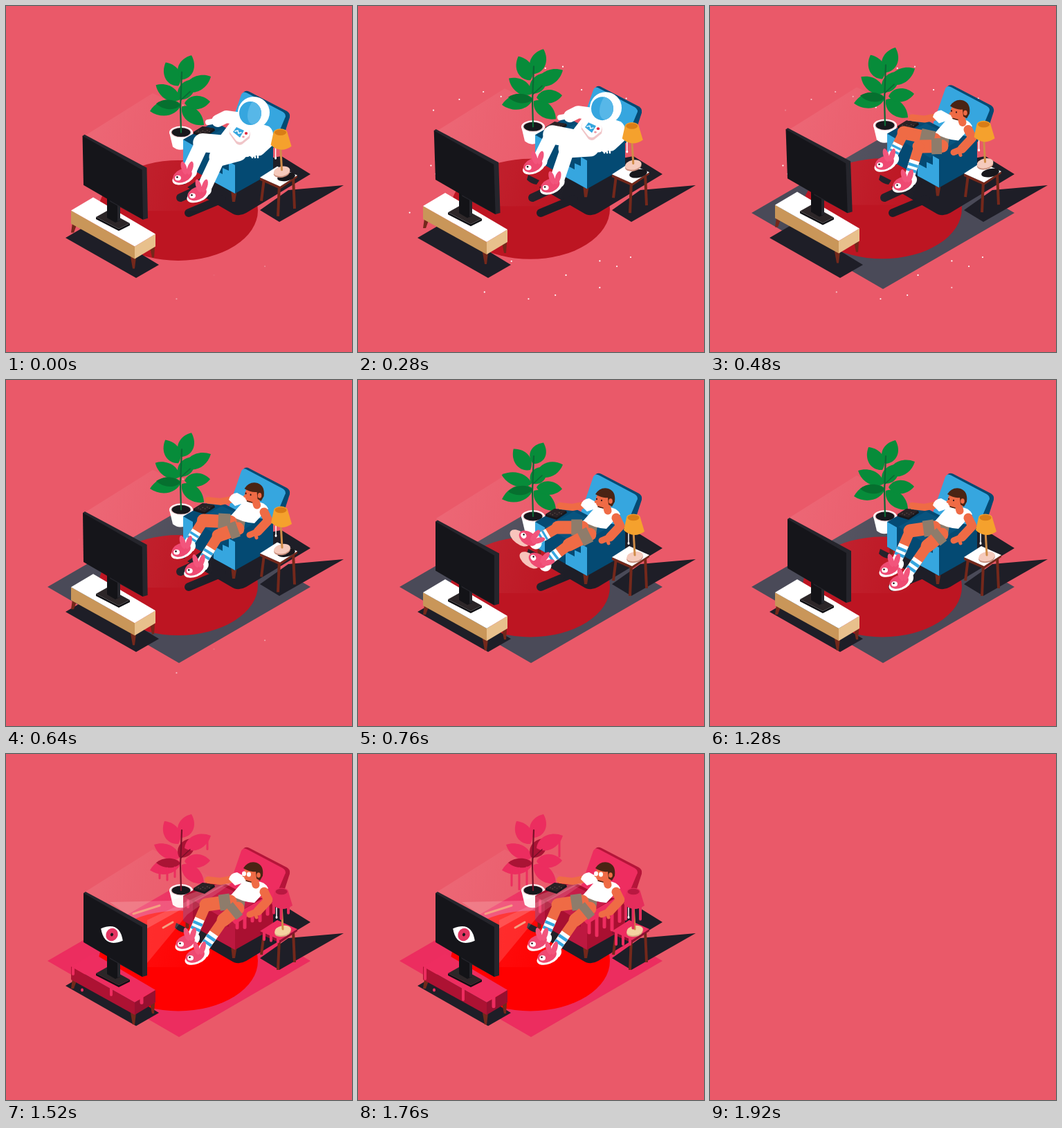
Animation, 500 px wide and 500 px high, one loop 1.96 s. Source, as an HTML page with a canvas:

```html
<!DOCTYPE html>
<html lang="en">
<head>
<meta charset="utf-8">
<title>Couch evening</title>
<style>
html,body{margin:0;width:100%;height:100%;overflow:hidden;background:#ea5969}
canvas{display:block;width:100vmin;height:100vmin}
</style>
</head>
<body>
<canvas id="c" width="500" height="500"></canvas>
<script>
const g = document.getElementById('c').getContext('2d');
const LOOP = 1960, STEP = 40, RISE = 20.5, DROP = 500, LAND = 680, MELT = 1320;
const BG = '#ea5969', DARK = '#1e1e27', SKIN = '#ef6b45', WOOD = '#74281b', PINK = '#ee4a72';

const mix = (a, b, k) => a + (b - a) * k;
const clamp = v => Math.max(0, Math.min(1, v));
const between = (p, q, k) => [mix(p[0], q[0], k), mix(p[1], q[1], k)];

// Height of the floating room: eases up, falls with gravity
function liftAt(t) {
  if (t < DROP) return -RISE + 8.5 * (1 - t / DROP) ** 2;
  return -RISE * (1 - clamp((t - DROP) / (LAND - DROP)) ** 2);
}
// Bend of soft parts: pulled up in the air, damped swing after landing
function flexAt(t) {
  const d = t - LAND;
  return d < 0 ? liftAt(t) / 7 : 9 * Math.exp(-d / 110) * Math.sin(d / 60 + .4);
}
const kickAt = t => Math.sin(Math.PI * clamp((t - 580) / 360)) ** 2;

function fill(c, d) {
  g.fillStyle = c;
  g.fill(new Path2D(d));
}
function oval(c, x, y, rx, ry, a = 0) {
  g.fillStyle = c;
  g.beginPath();
  g.ellipse(x, y, rx, ry, a, 0, 7);
  g.fill();
}
function line(c, w, pts, cap = 'round') {
  g.strokeStyle = c;
  g.lineWidth = w;
  g.lineCap = cap;
  g.lineJoin = 'round';
  g.beginPath();
  pts.forEach(p => g.lineTo(p[0], p[1]));
  g.stroke();
}
function at(x, y, draw, a = 0) {
  g.save();
  g.translate(x, y);
  g.rotate(a);
  draw();
  g.restore();
}
const drip = (c, x, y, len, w = 4) => line(c, w, [[x, y], [x, y + len]]);

function stars(t) {
  let seed = 11;
  const rnd = () => (seed = seed * 16807 % 2147483647) / 2147483647;
  for (let i = 0; i < 40; i++) {
    const a = i * 2.4, r = .62 + .38 * rnd(), lag = rnd();
    g.globalAlpha = clamp((t + 50 - lag * 180) / 110) * clamp((700 - lag * 200 - t) / 90);
    oval('#fff', 255 + 190 * r * Math.cos(a), 255 + 175 * r * Math.sin(a), 1.1, 1.1);
  }
  g.globalAlpha = 1;
}

function field() {
  const mark = (x, y, dx, dy) => line('#fff', 2, [[x - dx, y - dy], [x + dx, y + dy]], 'butt');
  g.save();
  g.beginPath();
  g.ellipse(249, 299, 115, 72.5, 0, 0, 7);
  g.clip();
  mark(266, 299, 86, 50);
  mark(226, 355, 36, 21);
  for (let i = 0; i < 11; i++) {
    const x = i * 13.2, y = -i * 7.9;
    if (i % 5) mark(245 + x, 366 + y, 6, 4);
    else mark(245 + x, 366 + y, 7, -4);
    mark(194 + x, 278 + y, 6, 4);
  }
  g.restore();
}

function floor(s, u) {
  if (s !== 'space') fill(s === 'melt' ? '#ec2d5f' : '#4a4a58', 'M60 299L250 189L440 299L250 409Z');
  oval({game: '#058b38', melt: '#ff0000'}[s] || '#bd1522', 249, 299 + u * .3, 115, 72.5);
  if (s === 'game') field();
  fill(DARK, 'M86 335L122 314L221 374L188 393Z');
  fill(DARK, 'M367 295L408 266L488 259L395 312Z');
  fill(DARK, 'M398 217L440 243L347 299Q335 306 324 298L262 262L300 235Z');
  fill(DARK, 'M246 244L262 252L258 258Q250 257 244 251Z');
  if (s === 'space' || s === 'home') {
    line(DARK, 12, [[264, 299], [312, 279]]);
    if (u < -3) line(DARK, 12, [[252, 277], [300, 255]]);
  }
}

function beam(u) {
  const b = g.createLinearGradient(115, 200, 310, 250);
  b.addColorStop(0, 'rgba(255,225,225,.1)');
  b.addColorStop(.5, 'rgba(255,225,225,.05)');
  b.addColorStop(1, 'rgba(255,225,225,0)');
  at(0, u, () => fill(b, 'M113 200L212 138L345 200L345 308H204Z'));
}

function rays() {
  fill('rgba(255,215,215,.22)', 'M150 214L238 212L344 174L204 252Z');
  fill('rgba(255,215,215,.16)', 'M204 240L344 174L262 232L204 302Z');
  const c = '#f5a082';
  line(c, 3, [[184, 231], [222, 219]]);
  line(c, 3, [[227, 251], [241, 243]]);
}

function leaf(c, bx, by, tx, ty, w) {
  const dx = tx - bx, dy = ty - by, n = Math.hypot(dx, dy);
  const px = -dy / n * w, py = dx / n * w;
  g.fillStyle = c;
  g.beginPath();
  g.moveTo(bx, by);
  for (const k of [1, -1]) {
    const a = [bx + dx * .2 + px * k, by + dy * .2 + py * k];
    const b = [bx + dx * .7 + px * k, by + dy * .7 + py * k];
    if (k > 0) g.bezierCurveTo(...a, ...b, tx, ty);
    else g.bezierCurveTo(...b, ...a, bx, by);
  }
  g.fill();
}

function plant(s, f, len) {
  const m = s === 'melt', c = m ? '#ec2d5f' : '#078c3a', d = m ? '#aa1435' : '#06702f';
  const stem = m ? '#7a1028' : '#0b6834';
  fill('#fff', 'M236 197L241 218Q252 227 265 217L270 197Z');
  oval('#fff', 253, 197, 17, 9);
  oval('#f0c9ce', 253, 197, 15, 7.5);
  oval('#17171c', 253, 197, 13.5, 6.5);
  leaf(c, 254, 160, 286, 187 + f * .4, 14);
  leaf(c, 253, 157, 208, 168 + f, 15);
  leaf(c, 251, 150, 214 - f * 1.5, 131 + f * 1.4, 13);
  leaf(d, 252, 158, 217, 157 + f, 9);
  leaf(c, 258, 155, 295, 154 + f * .8, 13);
  leaf(c, 249, 130, 229 - f, 97 + f * .6, 15);
  leaf(c, 253, 121, 268, 87 + f * .8, 15);
  leaf(m ? d : c, 250, 149, 272, 122 + f, 14);
  leaf(c, 258, 136, 296, 118 + f, 14);
  line(stem, 2.2, [[253, 197], [252, 160], [254, 110]]);
  line(stem, 1.6, [[253, 150], [266, 138]]);
  if (m) {
    for (let i = 0; i < 3; i++) drip(c, 222 + i * 11, 166 - i, len * (1.5 + i % 2 * .4), 3);
    drip(c, 291, 124, len * 1.5, 3);
  }
}

function sofa(s, len) {
  const m = s === 'melt', a = m ? '#ee2d60' : '#36a6df', b = m ? '#a91031' : '#044a73';
  const front = m ? '#bd1840' : a;
  line(WOOD, 5, [[262, 240], [262, 252]], 'butt');
  fill(WOOD, 'M325 277H334L331 295H327Z');
  fill(m ? '#b51539' : b, 'M343 137Q346 133 352 136L406 164Q411 167 410 173L399 207L380 222Z');
  fill(a, 'M340 140Q343 134 349 138L400 165Q406 169 403 174L383 222L322 192Z');
  fill(b, 'M256 205L298 181Q304 179 310 184L350 205L386 211V252L331 283L256 241Z');
  fill(m ? '#c71d49' : '#08547f', 'M272 212L312 190L360 214L318 240Z');
  fill(front, 'M256 205L270 213V249L256 241Z');
  fill(front, 'M300 248L313 255V273L300 266Z');
  fill(front, 'M313 246L322 250V237L331 242V283L313 273Z');
  if (m) {
    fill(a, 'M322 237L374 207L387 212L331 246Z');
    for (let i = 0; i < 5; i++) drip(a, 334 + i * 11, 242 - i * 6, len * (1 + (i * .618) % 1), 5);
    drip(a, 263, 212, len);
  }
}

function foot(p, k) {
  at(p[0], p[1], () => {
    g.scale(1.1, 1.1);
    oval(k > .5 ? '#f8c4bc' : '#fff', -7 - 7 * k, 8 + 6 * k, 15, 8, -.35);
    oval('#fff', 3, 0, 8, 8);
    oval(PINK, -8, 5, 13, 8.5, -.4);
    oval('#f2557c', -6, -5, 3.6, 9, -.3);
    oval('#f2557c', 2, -5, 3.6, 9, .3);
    oval('#fff', -14, 8, 4, 3.4);
    oval('#2a1118', -15, 7, 1.2, 1.2);
  }, k);
}

function leg(s, hip, knee, ankle, k) {
  if (s === 'space') {
    line('#fff', 27, [hip, knee]);
    line('#fff', 21, [knee, ankle]);
  } else {
    line(SKIN, 19, [hip, knee]);
    line(SKIN, 15, [knee, between(knee, ankle, .6)]);
    line('#8e7c6b', 23, [hip, between(hip, knee, .45)], 'butt');
    line('#fff', 14.5, [between(knee, ankle, .42), ankle], 'butt');
    for (const n of [.52, .68])
      line('#36a6df', 14.5, [between(knee, ankle, n), between(knee, ankle, n + .08)], 'butt');
  }
  foot(ankle, k);
}

function remote() {
  fill('#17171c', 'M271 194L284 186L301 189L302 192L287 202L271 197Z');
  fill('#2b2225', 'M271 194L284 186L301 189L287 199Z');
  for (let i = 0; i < 6; i++) oval('#5b4a48', 278 + i * 3.2, 193 + (i % 2) * 2 - i * .3, 1, .7);
}

function helmet() {
  oval('#fff', 358, 166, 23, 23);
  oval('#36a6df', 353, 167, 16, 17);
  g.save();
  g.beginPath();
  g.ellipse(353, 167, 16, 17, 0, 0, 7);
  g.clip();
  oval('#57b7e8', 363, 162, 12, 22, .4);
  g.restore();
}

function fanHat() {
  fill('#0a7a39', 'M341 146Q346 142 350 147L349 160L340 158Z');
  fill('#e22d32', 'M339 171Q341 155 354 155Q368 158 368 174L360 178Z');
  fill('#b81c28', 'M339 171L343 168L363 175L360 179Z');
  fill('#0a7a39', 'M362 157Q367 153 372 158V172Q366 177 361 171Z');
  oval('#083f24', 345, 146, 4.5, 2);
  oval('#083f24', 367, 157, 5, 2);
  line('#fff', 2, [[345, 146], [350, 146], [354, 158]]);
  line('#fff', 2, [[366, 157], [362, 149], [358, 151], [359, 160]]);
}

function head(s) {
  line(SKIN, 11, [[358, 178], [361, 189]]);
  oval(SKIN, 353, 173, 9.5, 12, .25);
  oval(SKIN, 344, 176, 2.4, 2);
  fill('#4a2414', 'M343 165Q350 154 362 157Q373 161 371 176L367 183L362 180L361 170Q352 171 343 165Z');
  oval(SKIN, 365, 175, 2.8, 3.8);
  line('#4a2414', 1.6, [[347, 183], [354, 185]]);
  if (s === 'melt') {
    oval('#fff', 344, 173, 3, 3.4);
    oval('#fff', 351, 174, 3, 3.4);
  } else {
    oval('#2a1118', 345, 172, 1, 1.3);
    oval('#2a1118', 352, 174, 1, 1.3);
  }
  if (s === 'game') fanHat();
}

function torso(s) {
  if (s === 'space') {
    line('#fff', 18, [[340, 175], [318, 172], [306, 178]]);
    line('#fff', 8, [[304, 178], [292, 180]]);
    fill('#fff', 'M332 170L306 204L315 232L350 230L380 214Q392 196 380 186Z');
    return;
  }
  line(SKIN, 10, [[330, 180], [310, 184], [292, 182]]);
  fill('#8e7c6b', 'M324 203L346 211L343 229L322 232L311 215Z');
  fill(s === 'game' ? '#0b6b38' : '#fff',
    'M345 177L334 171Q324 172 322 181L331 190L340 187L325 204Q341 214 359 215L370 203L379 194Q374 184 362 184Z');
  if (s === 'game') {
    line('#f4b52c', 5, [[323, 177], [330, 189]], 'butt');
    at(339, 199, () => {
      g.fillStyle = '#fff';
      g.font = 'bold 21px Roboto, Arial, sans-serif';
      g.textAlign = 'center';
      g.textBaseline = 'middle';
      g.fillText('99', 0, 1);
    }, .32);
  }
}

function chestBox() {
  fill('#f0c5c8', 'M-14 -2Q-16 -13 -6 -14L14 -7Q17 -4 15 4L4 13Q0 15 -4 12Z');
  fill('#fff', 'M-14 -5Q-14 -15 -5 -15L13 -8Q17 -5 14 1L4 9Q0 11 -4 8Z');
  fill('#36a6df', 'M-9 -5L-4 -12L7 -7L1 3Z');
  line('#fff', 1.5, [[-6, -6], [-2, -7], [-1, -3], [3, -4]]);
  oval('#e22d42', 10, -3, 2.2, 2);
  oval('#ee9aa6', 6, 2, 1.8, 1.5);
}

function nearArm(s) {
  if (s === 'space') {
    line('#fff', 19, [[374, 195], [378, 207], [365, 219]]);
    line('#fff', 9, [[364, 220], [356, 226]]);
    for (let x = 355; x < 365; x += 4) line('#fff', 2.5, [[x, 222], [x + 1, 231]]);
    at(337, 199, chestBox);
    return;
  }
  line(SKIN, 13, [[373, 199], [379, 211], [364, 227]]);
  line(SKIN, 9, [[364, 227], [352, 232]]);
  line(SKIN, 5, [[360, 230], [362, 236]]);
  if (s === 'game') line('#f4b52c', 6, [[364, 191], [378, 201]], 'butt');
}

function person(s, u, kick) {
  const f = -u / RISE;
  // rest place, drift while floating, throw on landing
  const joint = (x, y, fx, fy, kx, ky) => [x + fx * f + kx * kick, y + fy * f + ky * kick];
  const turn = clamp(kick - f);
  at(0, u, () => { torso(s); remote(); });
  leg(s, [324, 213 + u], joint(289, 218, -9, -35, 0, -5), joint(268, 266, -7, -45, -13, -33), turn);
  leg(s, [335, 223 + u], joint(314, 240, -12, -37, -9, -2), joint(282, 286, 5, -35, -13, -21), turn);
  at(0, u, () => {
    nearArm(s);
    if (s === 'space') helmet();
    else at(f * 4, 0, () => head(s));
  });
}

function table(s, u, len) {
  const m = s === 'melt', top = m ? '#ee2d60' : '#fff';
  line(WOOD, 4, [[373, 258], [369, 290]], 'butt');
  line(WOOD, 4, [[415, 256], [417, 301]], 'butt');
  line(WOOD, 4, [[395, 266], [393, 312]], 'butt');
  fill(m ? '#8f1030' : WOOD, 'M367 256L396 269L421 253V256L396 273L367 260Z');
  fill(top, 'M367 256L392 240L421 253L396 269Z');
  if (u < -3) oval('#17171c', 405, 255, 13, 6, -.2);
  if (m) for (let i = 0; i < 3; i++) drip(top, 373 + i * 10, 259 + i * 4, len * (1 - i * .25));
}

function lamp(s, len) {
  const m = s === 'melt', c = m ? '#e52d5c' : '#f5a12d';
  oval(m ? '#d9b084' : '#c98f7d', 400, 257, 12, 7, -.2);
  oval(m ? '#f3d3a0' : '#f5cabc', 400, 255, 12, 7, -.2);
  line('#cf8c48', 3, [[398, 218], [400, 253]]);
  line('#fff', 1.5, [[391, 219], [391, 235]]);
  oval('#fff', 391, 236, 1.5, 2);
  fill(c, 'M388 199L384 217Q398 230 414 219L408 199Z');
  oval(c, 398, 199, 10, 5.5);
  oval(m ? '#b91841' : '#d97d16', 398, 199, 8.5, 4.2);
  if (m) for (let i = 0; i < 3; i++) drip(c, 387 + i * 10.5, 218 + i % 2 * 3, len * (1.3 + i % 2 * .6));
}

function ball(t) {
  const k = (t - 1040) / 200;
  oval(DARK, 221 + 70 * k, 307 - 40 * k, 17, 9, -.35);
  at(221 + 70 * k, 238 - 34 * k + 10 * k * k, () => {
    fill('#c9252b', 'M-20 0C-12 -16 12 -16 20 0C12 16 -12 16 -20 0Z');
    fill('#a61722', 'M-20 0C-8 10 8 10 20 0C12 16 -12 16 -20 0Z');
    line('#fff', 2, [[-9, 2], [9, 2]]);
    for (let x = -7; x < 9; x += 4.5) line('#fff', 1.6, [[x, -2], [x, 6]]);
  }, -.5 + k * 1.5);
}

function stand(s, len) {
  const m = s === 'melt', top = m ? '#ee2d60' : '#fff';
  fill(WOOD, 'M96 325L102 328L98 339H94Z');
  fill(WOOD, 'M208 360H215L214 375H211Z');
  fill(WOOD, 'M180 374H188L186 391H183Z');
  fill(m ? '#ad1233' : '#c99659', 'M94 307L186 359V377L94 326Z');
  fill(m ? '#971030' : '#e8c08c', 'M186 359L216 341V359L186 377Z');
  fill(top, 'M94 307L126 288L216 341L186 359Z');
  if (m) {
    drip(top, 97, 309, len);
    drip(top, 152, 339, len);
    drip(top, 196, 352, len * .8, 5);
    oval(top, 110, 341, 2, 2.6);
  }
}

function eye() {
  fill('#fff', 'M-18 0Q0 -23 18 0Q0 23 -18 0Z');
  oval('#e33561', 0, 0, 8.5, 9.5);
  oval('#17171c', 0, 0, 2, 2.4);
}

function tv(s, u, f) {
  fill('#101014', 'M130 317L163 334L179 326V329L163 337L130 320Z');
  fill('#2c2628', 'M130 317L146 308L179 326L163 334Z');
  fill('#131317', 'M146 282L165 292V322L158 325L146 318Z');
  fill('#26262c', 'M161 290L165 292V322L161 323Z');
  at(0, f * .8, () => {
    const lean = -u / RISE * .035;
    g.transform(1, 0, lean, 1, -272 * lean, 0);
    fill('#25252c', 'M112 201L115 199L204 247V320L197 322L150 296Z');
    fill('#15151a', 'M112 201L197 250V322L112 272Z');
    if (s === 'melt') at(153, 261, eye, .5);
  });
}

function sceneAt(t) {
  if (t < 400) return 'space';
  if (t >= MELT) return 'melt';
  return t >= 880 && t < 1240 ? 'game' : 'home';
}

function draw(t) {
  g.fillStyle = BG;
  g.fillRect(0, 0, 500, 500);
  if (t >= 1920) return;
  const s = sceneAt(t), u = liftAt(t), f = flexAt(t);
  const len = 2 + 14 * clamp((t - MELT) / 400);
  if (t < 720) stars(t);
  floor(s, u);
  beam(u);
  at(0, u * 1.2, () => plant(s, f, len));
  at(0, u, () => sofa(s, len));
  if (s === 'melt') rays();
  person(s, u, kickAt(t));
  at(0, u * .68, () => table(s, u, len));
  at(u * .12, u * 1.35, () => lamp(s, len));
  if (s === 'game' && t >= 920) ball(t);
  at(0, u * .95, () => stand(s, len));
  at(0, u, () => tv(s, u, f));
}

const start = performance.now();
function tick() {
  const t = (performance.now() - start) % LOOP;
  draw(Math.floor(t / STEP) * STEP);
  requestAnimationFrame(tick);
}
tick();
</script>
</body>
</html>
```
